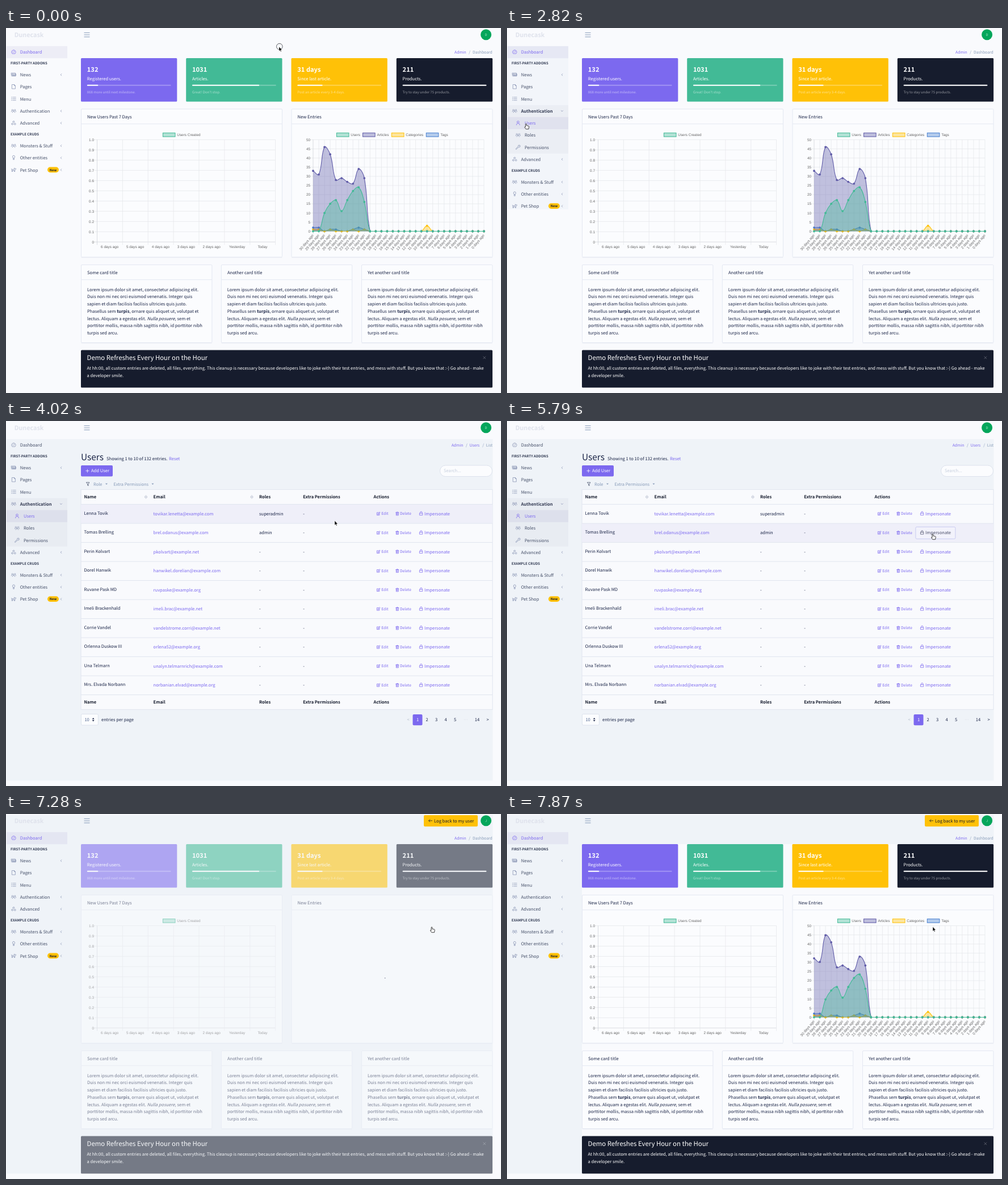
Animation, 872 px wide and 642 px high, one loop 8 s. Source, as an HTML page:

```html
<!DOCTYPE html>
<html lang="en">
<head>
<meta charset="utf-8">
<title>Admin panel</title>
<style>
html, body { margin: 0; width: 100%; height: 100%; overflow: hidden; background: #f9fafd; }
svg {
  display: block; width: 872px; height: 642px; fill: #1b2547;
  font-family: "Noto Sans CJK JP", "Noto Sans CJK SC", "Noto Sans CJK TC", "Open Sans", sans-serif;
  font-size: 7.6px; text-rendering: geometricPrecision;
}
.chart { font-family: "Liberation Sans", Arial, sans-serif; font-size: 6.4px; fill: #666; }
.item { fill: #465069; }
.item .row { fill: none; }
.item .icon { stroke: #8490b0; }
.item.on { fill: #7c69ef; }
.item.on .row { fill: #7060b0; fill-opacity: .09; }
.item.on .icon { stroke: #7c69ef; }
.icon { fill: none; stroke-width: .75; stroke-linecap: round; stroke-linejoin: round; }
.link { fill: #7c69ef; }
.link .icon { stroke: #7c69ef; }
.link.dark { fill: #4a4e69; }
.link.dark .icon { stroke: #4a4e69; }
.open text { font-weight: bold; fill: #30384f; }
</style>
</head>
<body>
<script>
const PURPLE = '#7c69ef', GREEN = '#42ba96', YELLOW = '#ffc107', DARK = '#161c2d';
const TICK = 148.5, LOOP = 8000;

const text = (x, y, s, a = '') => `<text x="${x}" y="${y}" ${a}>${s}</text>`;
const rect = (x, y, w, h, a = '') => `<rect x="${x}" y="${y}" width="${w}" height="${h}" ${a}/>`;
const line = (x1, y1, x2, y2, c, a = '') =>
  `<line x1="${x1}" y1="${y1}" x2="${x2}" y2="${y2}" stroke="${c}" ${a}/>`;
const icon = (x, y, d, a = '') => `<path class="icon" transform="translate(${x} ${y})" d="${d}" ${a}/>`;
const group = (id, s, a = '') => `<g id="${id}" ${a}>${s}</g>`;
const range = n => [...Array(n).keys()];
const END = 'text-anchor="end"', MID = 'text-anchor="middle"', BOLD = 'font-weight="bold"';

const ICON = {
  gauge: 'M-2.8 2.6A3.7 3.7 0 1 1 2.8 2.6ZM0 1L1.5-1.2M-2.2 0H-1.8M0-2.2V-2',
  news: 'M-4-2.7H3V2.7H-3.2Q-4 2.7-4 1.8ZM3-1.2H4V2Q4 2.7 3 2.7M-2.5-1.2H-.5V.5H-2.5ZM.6-1H2M.6.4H2M-2.5 1.6H2',
  page: 'M-2.7-3.7H1L2.9-1.8V3.7H-2.7ZM1-3.7V-1.8H2.9',
  list: 'M-3.8-2.7H-2.6M-1.2-2.7H3.8M-3.8 0H-2.6M-1.2 0H3.8M-3.8 2.7H-2.6M-1.2 2.7H3.8',
  team: 'M-1.3-.6A1.3 1.3 0 1 1 1.3-.6A1.3 1.3 0 1 1-1.3-.6M-2.2 3Q-2 .9 0 .9T2.2 3M-2.2-2.6A1 1 0 1 0-2.4-.6Q-4-.4-4 1.5M2.2-2.6A1 1 0 1 1 2.4-.6Q4-.4 4 1.5',
  cogs: 'M-1.4-2A1.4 1.4 0 1 1 1.4-2A1.4 1.4 0 1 1-1.4-2M-3.7 1.9A1.4 1.4 0 1 1-.9 1.9A1.4 1.4 0 1 1-3.7 1.9M.9 1.9A1.4 1.4 0 1 1 3.7 1.9A1.4 1.4 0 1 1 .9 1.9',
  bulb: 'M-.8.8Q-2.3 0-2-1.8A2 2 0 0 1 2-1.8Q2.3 0 .8.8ZM-.8.8V3.4H.8V.8',
  dog: 'M-3.8-1.6L-3-.4H1V-3L2-2.2H3.8V-.6L2.2.4V3.2H1V1.4H-2V3.2H-3.2V-.4',
  user: 'M-1.8-1.6A1.8 1.8 0 1 1 1.8-1.6A1.8 1.8 0 1 1-1.8-1.6M-3 3.6Q-2.8.4 0 .4T3 3.6',
  key: 'M0-1.6A1.9 1.9 0 1 1 1.6.2L.6.4L-3 3.8H-3.8V2.6L-.2-.8ZM1.9-1.9H2.1',
  edit: 'M1.6 0V2.6H-2.8V-2H0M-1 1L-.8-.2L2-2.9L2.9-2L.2.8Z',
  bin: 'M-2.6-2H2.6M-1-2V-2.9H1V-2M-2-2V2.9H2V-2M-.7-.6V1.6M.7-.6V1.6',
  lock: 'M-2.5-.5H2.5V3H-2.5ZM-1.6-.5V-1.8A1.6 1.6 0 0 1 1.6-1.8V-.5'
};

// Sidebar
const item = (y, label, ic, { id = '', arrow, sub } = {}) =>
  `<g class="item" ${id && `id="${id}"`} data-y="${y}" data-sub="${sub ? 1 : ''}">` +
  rect(1, y - 10.6, 107, 21.25, 'class="row"') +
  icon(sub ? 19.5 : 13.5, y - .3, ICON[ic]) +
  text(sub ? 31 : 24.7, y + 2.9, label) +
  (arrow ? icon(97, y, 'M.8-1.6L-.8 0L.8 1.6') : '') + '</g>';
const heading = (y, s) => text(8, y, s, `font-size="6.08" ${BOLD} fill="#343d55"`);

const sidebar =
  item(42.5, 'Dashboard', 'gauge', { id: 'dashItem' }) + heading(64.2, 'FIRST-PARTY ADDONS') +
  item(82.2, 'News', 'news', { arrow: 1 }) + item(103.5, 'Pages', 'page') + item(124.8, 'Menu', 'list') +
  item(146, 'Authentication', 'team', { id: 'auth', arrow: 1 }) +
  `<clipPath id="subClip">${rect(0, 135.4, 110, 64, 'id="subBox"')}</clipPath>` +
  group('sub', rect(1, 135.4, 107, 85.6, 'fill="#6a6a90" fill-opacity=".05"') +
    item(167.3, 'Users', 'user', { id: 'usersItem', sub: 1 }) +
    item(188.5, 'Roles', 'team', { sub: 1 }) + item(209.8, 'Permissions', 'key', { sub: 1 }),
    'clip-path="url(#subClip)"') +
  group('lower', item(167.2, 'Advanced', 'cogs', { arrow: 1 }) + heading(189.3, 'EXAMPLE CRUDS') +
    item(207.2, 'Monsters &amp; Stuff', 'team', { arrow: 1 }) +
    item(228.4, 'Other entities', 'bulb', { arrow: 1 }) + item(249.6, 'Pet Shop', 'dog', { arrow: 1 }) +
    rect(73, 244.6, 20, 9.6, `rx="4.8" fill="${YELLOW}"`) +
    text(83, 251.5, 'New', `${MID} font-size="5.7" ${BOLD} fill="${DARK}"`));

// Header
const crumbs = list => list.map(([x, s, link]) =>
  text(x, 44.6, s, `font-size="6.84" ${s === '/' ? MID : ''} fill="${link ? PURPLE : '#869ab8'}"`)).join('');
const header =
  text(40.5, 15.8, 'Dunecask', `${MID} font-size="10.8" ${BOLD} fill="#dfe2ec"`) +
  [8.3, 12, 15.7].map(y => line(137.5, y, 147.5, y, '#869ab8')).join('') +
  '<circle cx="845.6" cy="11.7" r="9.5" fill="#04a65b"/>' +
  text(845.6, 13.8, 'D', `id="initial" ${MID} font-size="5.8" fill="#9fe3c1"`) +
  group('back', rect(736, 2, 95, 20, `rx="2" fill="${YELLOW}"`) +
    icon(747.7, 12, 'M3-.2H-3M-.8-2.4L-3-.2L-.8 2', `stroke="${DARK}"`) +
    text(754, 14.8, 'Log back to my user', `fill="${DARK}"`)) +
  group('dashCrumbs', crumbs([[790, 'Admin', 1], [816.5, '/'], [822, 'Dashboard']])) +
  group('userCrumbs', crumbs([[784.7, 'Admin', 1], [811.3, '/'], [816.6, 'Users', 1], [840.6, '/'], [845.8, 'List']]));

// Dashboard
const stat = (x, color, value, label, part, note) =>
  rect(x, 53, 169.3, 76.6, `rx="1.5" fill="${color}"`) +
  `<g fill="#fff">${text(x + 10.8, 77, value, `font-size="11.1" ${BOLD}`)}${text(x + 10.8, 92.1, label)}` +
  rect(x + 10.8, 99.7, 147.8, 2.1, 'rx="1" fill-opacity=".28"') +
  rect(x + 10.8, 99.7, 147.8 * part, 2.1, 'rx="1"') +
  text(x + 10.8, 115.4, note, 'font-size="6.08" fill-opacity=".55"') + '</g>';
const card = (x, y, w, h, title) =>
  rect(x, y, w, h, 'rx="1.5" fill="#fbfcfe" stroke="#e4e8f2"') +
  line(x, y + h + .7, x + w, y + h + .7, '#dde2ed', 'stroke-width=".6"') +
  line(x, y + 26.2, x + w, y + 26.2, '#e4e8f2') + text(x + 10.6, y + 16, title);
const legend = (x, label, color) =>
  rect(x, 184.6, 21.6, 6.6, `fill="${color}" fill-opacity=".4" stroke="${color}"`) + text(x + 24.9, 190.3, label);

const GRID = '#e4e6ea', AXIS = '#cdd0d6', THIN = 'stroke-width=".7"';
const leftChart = legend(276.4, 'Users Created', GREEN) +
  range(11).map(i => {
    const y = 196.5 + i * 17.98;
    return line(155.3, y, 474.6, y, i === 10 ? AXIS : GRID, THIN) +
      text(155, y + 2.2, i === 10 ? '0' : (1 - i / 10).toFixed(1), END);
  }).join('') +
  range(8).map(i => line(160.5 + i * 44.87, 196.5, 160.5 + i * 44.87, 381.5, i ? GRID : AXIS, THIN)).join('') +
  range(7).map(i => text(182.7 + i * 44.87, 387.4,
    i < 5 ? `${6 - i} days ago` : ['Yesterday', 'Today'][i - 5], MID)).join('');

const X0 = 541, STEP = 10.033, TOP = 196.5, BASE = 357.5, UNIT = 3.22;
const tags = '#467fd0', violet = '#605ca8';
const rightChart =
  legend(582.4, 'Users', GREEN) + legend(628.5, 'Articles', violet) +
  legend(679.4, 'Categories', YELLOW) + legend(740.3, 'Tags', tags) +
  range(11).map(i => {
    const y = TOP + i * 16.1;
    return line(536, y, 842, y, i === 10 ? AXIS : GRID, THIN) + text(536, y + 2.2, 50 - i * 5, END);
  }).join('') +
  range(31).map(i => {
    const x = X0 + i * STEP;
    return line(x, TOP, x, 362.5, i ? GRID : AXIS, THIN) +
      text(0, 0, `${30 - i} days ago`, `${END} transform="translate(${x + 1} 365) rotate(-50)"`);
  }).join('') + group('series', '');

const lorem = ['Lorem ipsum dolor sit amet, consectetur adipiscing elit.',
  'Duis non mi nec orci euismod venenatis. Integer quis',
  'sapien et diam facilisis facilisis ultricies quis justo.',
  `Phasellus sem <tspan ${BOLD}>turpis</tspan>, ornare quis aliquet ut, volutpat et`,
  'lectus. Aliquam a egestas elit. <tspan font-style="italic">Nulla posuere</tspan>, sem et',
  'porttitor mollis, massa nibh sagittis nibh, id porttitor nibh', 'turpis sed arcu.'];
const dashboard =
  stat(132, PURPLE, '132', 'Registered users.', .132, '868 more until next milestone.') +
  stat(317.2, GREEN, '1031', 'Articles.', .8, 'Great! Don\'t stop.') +
  stat(502.5, YELLOW, '31 days', 'Since last article.', .3, 'Post an article every 3-4 days.') +
  stat(687.8, DARK, '211', 'Products.', 1, 'Try to stay under 75 products.') +
  card(132.5, 142.5, 354, 260.5, 'New Users Past 7 Days') + card(503, 142.5, 354, 260.5, 'New Entries') +
  `<g class="chart">${leftChart}</g>` + group('right', rightChart, 'class="chart"') +
  '<circle id="seed" cx="667.7" cy="288.6" r=".8"/>' +
  [[132.5, 'Some card title'], [379.3, 'Another card title'], [626.5, 'Yet another card title']].map(([x, s]) =>
    card(x, 416.5, 230.4, 137, s) + lorem.map((l, i) => text(x + 10.5, 462.7 + i * 12.75, l)).join('')).join('') +
  rect(132, 566.6, 725, 65.8, `rx="1.5" fill="${DARK}"`) +
  `<g fill="#fff">${text(142.6, 584.2, 'Demo Refreshes Every Hour on the Hour', 'font-size="11.4"')}` +
  text(142.6, 601.1, 'At hh:00, all custom entries are deleted, all files, everything. This cleanup is necessary because developers like to joke with their test entries, and mess with stuff. But you know that :-) Go ahead - make') +
  text(142.6, 613.8, 'a developer smile.') + '</g>' +
  icon(842.8, 579.8, 'M-2-2L2 2M2-2L-2 2', 'stroke="#6d717d"');

// Users list
const people = [
  ['Lenna Tovik', 'tovikar.lenetta@example.com', 'superadmin'],
  ['Tomas Brelling', 'brel.odanus@example.com', 'admin'],
  ['Perin Kolvart', 'pkolvart@example.net'],
  ['Dorel Hanwik', 'hanwikel.dorelian@example.com'],
  ['Ruvane Pask MD', 'ruvpaske@example.org'],
  ['Imeli Brackenhald', 'imeli.brac@example.net'],
  ['Corrie Vandel', 'vandelstrome.corri@example.net'],
  ['Orlenna Duskow III', 'orlena52@example.org'],
  ['Una Telmarn', 'unalyn.telmarnrich@example.com'],
  ['Mrs. Elvada Norbann', 'norbanian.elvad@example.org']];
const ROW0 = 146.6, ROW = 33.5, RULE = '#e1e5ef';
const columns = y => [[137.5, 'Name'], [259.6, 'Email'], [446, 'Roles'], [523.2, 'Extra Permissions'], [647.6, 'Actions']]
  .map(([x, s]) => text(x, y, s, `font-size="7.5" ${BOLD} fill="#161c2d"`)).join('');
const person = ([name, mail, role = '-'], i) => {
  const y = ROW0 + i * ROW, b = y + 19;
  return line(132, y, 857, y, RULE) + text(137.5, b - 1.1, name) + text(259.6, b, mail, 'class="link"') +
    text(446, b + .3, role) + text(523.2, b + .3, '-') +
    `<g class="link" font-size="6.65">${icon(656.2, b - 2.6, ICON.edit)}${text(661.2, b - .2, 'Edit')}` +
    icon(689.3, b - 2.6, ICON.bin) + text(694, b - .2, 'Delete') + '</g>' +
    `<g class="link" ${i === 1 ? 'id="act"' : ''}>${icon(731.3, b - 3, ICON.lock)}${text(737, b, 'Impersonate')}</g>`;
};
const sorter = x => icon(x, 133.6, 'M-2-.7L0-3L2-.7ZM-2 .7L0 3L2 .7Z', 'stroke="#bcc3d2"');
const caret = x => `<path d="M${x} 109.7h4l-2 2.2z" fill="#869ab8"/>`;
const users =
  text(132, 69.2, 'Users', 'font-size="15.4"') + text(177, 69, 'Showing 1 to 10 of 132 entries.') +
  text(287, 69, 'Reset', 'class="link"') +
  rect(132, 78, 56, 19.6, `rx="2" fill="${PURPLE}"`) + icon(143.4, 87.7, 'M-2.6 0H2.6M0-2.6V2.6', 'stroke="#fff"') +
  text(150, 90.4, 'Add User', 'fill="#fff"') +
  rect(764.5, 78, 92, 19.6, 'rx="9.8" fill="#fbfcfe" stroke="#dde2ed"') + text(771, 90.2, 'Search...', 'fill="#c6cedd"') +
  icon(144.3, 111, 'M-2.7-3H2.7L.7-.2V3L-.7 2V-.2Z', 'stroke="#3f4a63"') +
  `<g fill="#869ab8" font-size="7.5">${text(154, 113.7, 'Role')}${text(189.6, 113.7, 'Extra Permissions')}</g>` +
  caret(175) + caret(256.4) +
  rect(132, 120.6, 725, 386.8, `fill="#f9fafd" stroke="${RULE}"`) + columns(136) + sorter(246.5) + sorter(433) +
  rect(132, 0, 725, ROW, 'id="hover" fill="#efeff9"') +
  rect(719.9, 186.3, 70, 21, 'id="focus" rx="2" fill="#f2f2fb" stroke="#c9cbf0"') +
  people.map(person).join('') + line(132, 481.6, 857, 481.6, RULE) + columns(497) +
  rect(132.4, 515.5, 30, 19.5, 'rx="2" fill="#fbfcfe" stroke="#dde2ed"') + text(138.4, 527.7, '10', 'fill="#506690"') +
  '<path d="M151.8 524.4h3.8l-1.9-2.4zM151.8 526h3.8l-1.9 2.4z"/>' + text(168, 527.5, 'entries per page') +
  rect(716.5, 516, 17, 19.2, `rx="2" fill="${PURPLE}"`) +
  [[708.7, '&lt;', '#b5bccb'], [725, '1', '#fff'], [741.5, '2'], [758, '3'], [774.5, '4'], [791, '5'],
    [809.7, '…', '#c6cbd6'], [830, '14'], [848.7, '&gt;']]
    .map(([x, s, c = '#1b2547']) => text(x, 528.3, s, `${MID} fill="${c}"`)).join('');

document.body.innerHTML = `<svg viewBox="0 0 872 642">
  ${rect(0, 0, 872, 642, 'fill="#f9fafd"')}
  ${rect(1, 32, 856.5, 600.5, 'id="tint" fill="#eff3f8"')}
  ${rect(132, 53, 725.5, 579.5, 'id="plate" fill="#f9fafd"')}
  ${group('side', sidebar)}${header}${group('dash', dashboard)}${group('users', users)}
  <circle id="ring" r="5.3" fill="none" stroke="#4a4d55" stroke-width=".9"/>
  <path id="arrow" d="M0 0V8.3L1.9 6.6 3.2 9.6 4.5 9 3.2 6.1H5.8Z" fill="#000" stroke="#fff" stroke-width=".5"/>
  <path id="hand" d="M-.9 .9Q0-.5 .9 .9V3.6L4.5 4.4Q5.4 4.7 5.3 5.7L4.5 9.8H-.2L-2.6 6.4Q-2.3 5.2-.9 6.2Z"
    fill="#fff" stroke="#111" stroke-width=".8" stroke-linejoin="round"/>
</svg>`;

const $ = id => document.getElementById(id);
const show = (id, on) => { $(id).style.display = on ? '' : 'none'; };
const set = (id, attrs) => { for (const a in attrs) $(id).setAttribute(a, attrs[a]); };
const items = [...document.querySelectorAll('.item')];

// Area chart, bezier tension .4
const pad = (a, extra = {}) => range(31).map(i => extra[i] ?? a[i] ?? 0);
const data = [
  [tags, pad([2, 2, 0, 1, 1, 0, 0, 1, 2, 1])],
  [YELLOW, pad([1, 1, 0, 1, 0, 0, 0, 1, 0, 1], { 20: 3 })],
  [violet, pad([33, 31, 46, 42, 28, 29, 27, 26, 34, 29])],
  [GREEN, pad([0, 0, 10, 15, 17, 11, 17, 22, 24, 16])]];
const clampY = y => Math.min(BASE, Math.max(TOP, y));

function curve(pts) {
  const ctl = pts.map((c, i) => {
    const p = pts[i - 1] || c, n = pts[i + 1] || c;
    const a = Math.hypot(c[0] - p[0], c[1] - p[1]), b = Math.hypot(n[0] - c[0], n[1] - c[1]);
    const at = f => [c[0] + f * (n[0] - p[0]), clampY(c[1] + f * (n[1] - p[1]))];
    return [at(-.4 * a / (a + b)), at(.4 * b / (a + b))];
  });
  return 'M' + pts[0] + pts.slice(1).map((p, i) => `C${ctl[i][1]} ${ctl[i + 1][0]} ${p}`).join('');
}

function drawSeries(grow) {
  $('series').innerHTML = data.map(([color, values]) => {
    const pts = values.map((v, i) => [X0 + i * STEP, BASE - v * UNIT * grow]);
    const d = curve(pts);
    return `<path d="${d}V${BASE}H${X0}Z" fill="${color}" fill-opacity=".38"/>` +
      `<path d="${d}" fill="none" stroke="${color}" stroke-width="1.1"/>` +
      pts.map(([x, y]) => `<circle cx="${x}" cy="${y}" r="1.9" fill="${color}"/>`).join('');
  }).join('');
}

// Pointer stops, one per tick from the given tick on
const moves = {
  0: [[481, 33]],
  4: [[470, 32], [336, 31], [70, 62], [52, 86], [43, 108], [38, 127], [36, 139], [36, 143]],
  14: [[35, 150], [34, 161], [33.5, 168]],
  24: [[110, 171], [270, 170], [440, 172], [579, 175.5], [622, 192], [634, 204]],
  30: [[655, 204], [690, 200], [730, 197], [765, 194], [788, 193], [780, 195], [760, 197], [750, 198.5]]
};
const stops = [];
for (const k in moves) moves[k].forEach((p, i) => { stops[+k + i] = p; });
const pointer = k => { while (!stops[k]) k--; return stops[k]; };

const fadeUsers = [.03, .28, .556, .79, .97, 1];
const fadeDash = [.02, .02, .28, .556, .79, .91, .97, 1];
const fade = (list, i) => list[Math.min(i, list.length - 1)];

function draw(k) {
  const [x, y] = pointer(k);
  const onUsers = k >= 22 && k < 46, later = k >= 46;
  const shift = k === 13 ? 32 : k > 13 && k < 46 ? 63.75 : 0;

  show('tint', k >= 14);
  set('tint', k < 22 ? { y: 32, width: 107, height: 287, fill: '#f2f5fa' }
    : { y: later ? 2 : 32, width: 856.5, height: later ? 630.5 : 600.5, fill: '#eff3f8' });
  show('plate', k >= 51);
  show('dash', !onUsers);
  show('users', onUsers);
  show('dashCrumbs', !onUsers);
  show('userCrumbs', onUsers);
  show('back', later);
  $('initial').textContent = later ? 'J' : 'D';
  $('dash').style.opacity = later ? fade(fadeDash, k - 46) : 1;
  $('users').style.opacity = onUsers ? fade(fadeUsers, k - 22) : 1;

  show('sub', shift);
  set('subBox', { height: 21.6 + shift });
  set('lower', { transform: `translate(0 ${shift})` });
  $('auth').classList.toggle('open', shift > 0);
  $('auth').lastChild.setAttribute('transform', `translate(97 146)${shift ? ' rotate(-90)' : ''}`);
  for (const el of items) {
    const mid = +el.dataset.y + (el.parentNode.id === 'lower' ? shift : 0);
    const over = x < 108 && Math.abs(y - mid) < 10.6 && (shift || !el.dataset.sub);
    const active = el.id === 'dashItem' && !onUsers || el.id === 'usersItem' && onUsers;
    el.classList.toggle('on', Boolean(over || active));
  }

  const row = Math.floor((y - ROW0) / ROW);
  show('hover', x > 132 && row >= 0);
  set('hover', { y: ROW0 + row * ROW });
  show('focus', k >= 38);
  $('act').classList.toggle('dark', k >= 33);

  const lead = Math.min(1, Math.max(0, (k - 49) * .1485 + .007));
  show('right', !later || k >= 50);
  show('seed', k === 49);
  drawSeries(later ? 1 - (1 - lead) ** 4 : 1);

  const hand = x < 108 && y > 32 || k >= 30 && k < 50;
  show('hand', hand);
  show('arrow', !hand);
  set('hand', { transform: `translate(${x} ${y})` });
  set('arrow', { transform: `translate(${x} ${y}) scale(.92)` });
  show('ring', [0, 12, 18, 38].includes(k));
  set('ring', { cx: x + .8, cy: y - .4 });
}

let last = -1;
const start = performance.now();
function frame() {
  const t = (performance.now() - start) % LOOP;
  const k = Math.min(53, Math.floor((t + 6) / TICK));
  if (k !== last) draw(last = k);
  requestAnimationFrame(frame);
}
frame();
</script>
</body>
</html>
```
